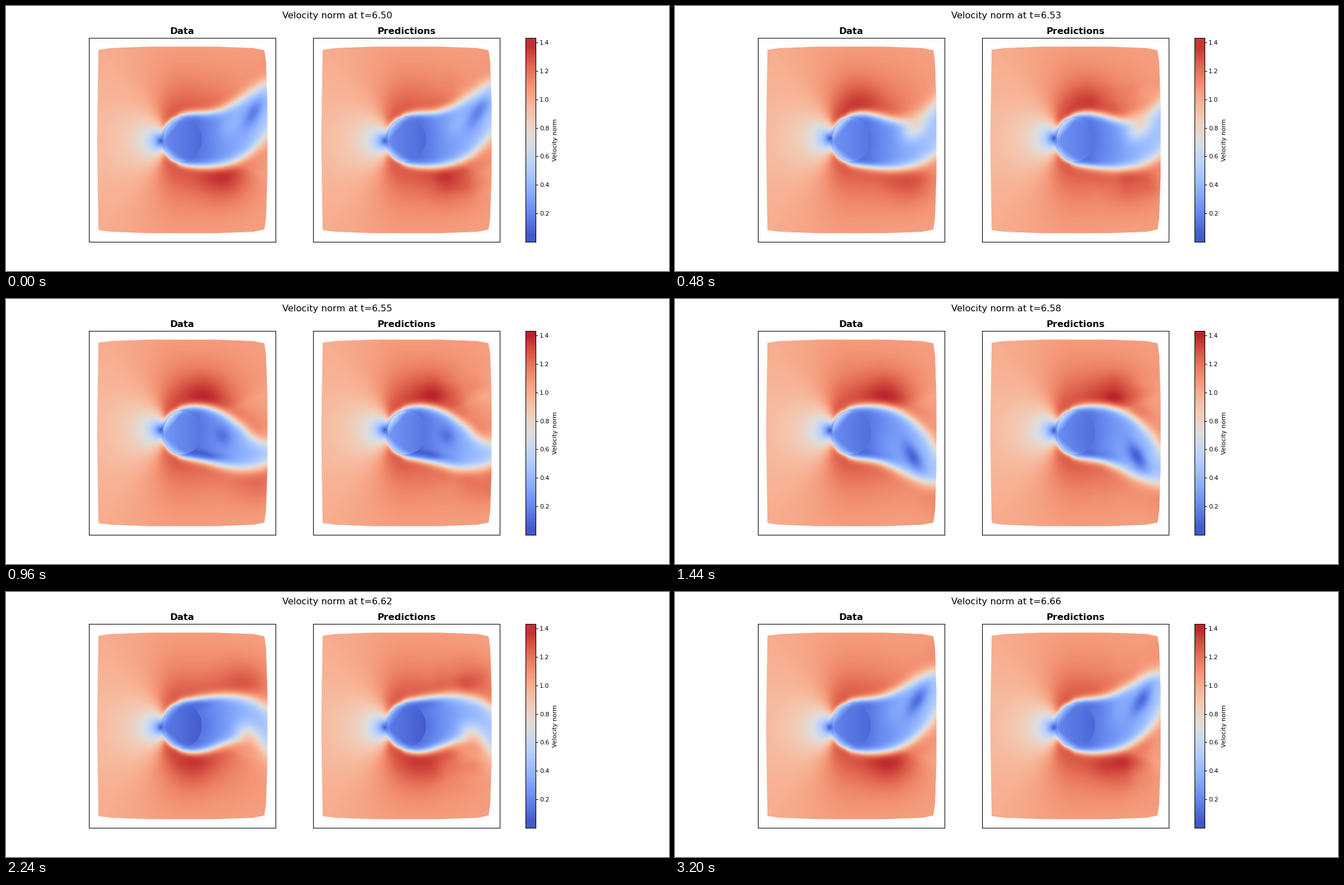
A matplotlib script that plays this animation: 1183x473 px, repeating every 3360 ms.

```python
import numpy as np
import matplotlib.pyplot as plt
from matplotlib.animation import FuncAnimation
from matplotlib.patches import Polygon

W, H, DPI = 1183, 473, 128
FRAMES, INTERVAL = 21, 160
PERIOD = 20.7                    # vortex shedding period, in frames
OMEGA = 2 * np.pi / PERIOD
VMAX = 1.432
CX, CY, RX, RY = 315, 238.5, 34.5, 38.5
LEFT, RIGHT, TOP, BOTTOM = 147.9, 481.25, 56.8, 421
GAP = 400                        # distance between the two panels

plt.rcParams["font.family"] = "DejaVu Sans"

col = np.arange(160.5, 470)
row = np.arange(70.5, 408)
xs, ys = np.meshgrid(col, row)

# The domain is symmetric about the axis
UPPER = [(162.5, 239), (163.5, 170), (165, 78), (188, 75), (255, 72.5),
         (374, 72.5), (441, 75), (461, 79), (464, 100), (466.5, 175)]
OUTLINE = UPPER + [(x, 478 - y) for x, y in reversed(UPPER)]


def step(d, width):
    return 0.5 * (1 + np.tanh(d / width))


def blob(x, y, cx, cy, long, short, angle=0.0):
    c, s = np.cos(angle), np.sin(angle)
    u = (x - cx) * c + (y - cy) * s
    v = (y - cy) * c - (x - cx) * s
    return np.exp(-(u / long) ** 2 - (v / short) ** 2)


def edge(p):
    """Height of the upper wake edge: a skewed wave that grows downstream."""
    t = np.clip((col - 325) / 141, 0, None)
    mean = 49 * (1 - np.exp(-np.maximum(col - 275, 0) / 17)) - 13 * t ** 3
    a = OMEGA * (p + 1.2 - 5.2 * t)
    y = mean - 67 * t ** 1.85 * np.sin(a + 0.55 * np.sin(a))
    slope = np.where(col > 310, np.gradient(y), 0)
    return y, np.sqrt(1 + slope ** 2)


def free_stream(p):
    """Speed around a blunt body, stretched downstream and capped."""
    x = (xs - CX) / RX
    x = np.where(x > 0, 0.38 * x, x)
    y = (ys - CY - 5 * np.cos(OMEGA * (p - 17))) / RY
    r2 = np.maximum(x * x + y * y, 0.6)
    cos2 = (x * x - y * y) / r2
    cos2 = np.where(x > 0, np.minimum(cos2, 0), cos2)
    speed = np.sqrt(np.maximum(1 - 2.5 * cos2 / r2 + (1.25 / r2) ** 2, 0))
    return np.where(speed > 1, 1 + 0.27 * np.tanh((speed - 1) / 0.27), speed)


def fast_lobe(q, dist, width, shift):
    """Fast patch that hugs one wake edge and drifts downstream."""
    total = 0
    for age in (q % PERIOD, q % PERIOD + PERIOD):
        cx = 308 + 7 * age + 0.14 * age ** 2 + shift
        amp = 0.19 * np.sin(np.pi * min(age / 23, 1)).clip(0) ** 0.7
        total = total + amp * np.exp(-((xs - cx) / (38 + age)) ** 2)
    fade = np.exp(-(np.maximum(dist - 18, 0) / 45) ** 2)
    return total * fade * step(dist, width)


def vortex(q, y):
    """Slow core, lighter patch behind it and the slow shear band."""
    q %= PERIOD
    turn = step(q - 7.5, 1.5)
    core = blob(xs, y, 350 + 12.6 * (q - 3), 50 * turn, 15 + 16 * turn, 13, 1.05)
    patch = blob(xs, y, 385 + 9.8 * (q - 9), 26 - 0.35 * (q - 10.35) ** 2,
                 26, 18, 0.9)
    band = blob(xs, y - 37 - 0.13 * (xs - 325), 352, 0, 36, 8)
    return (0.5 * step(q - 12.3, 2.3) * patch
            - 0.28 * np.exp(-((q - 9) / 3.5) ** 2) * core
            - 0.17 * np.exp(-((q - 6.3) / 2.8) ** 2) * band)


def body(p):
    """Flat facets inside the cylinder."""
    upper = ((xs - 282) * -42 + (ys - 243) * -36) / 55.3
    lower = ((xs - 282) * -33 + (ys - 243) * 41) / 52.6
    value = 0.15 + 0.05 * np.cos(OMEGA * (p - 5)) - 0.0016 * (xs - CX)
    value += (0.018 + 0.008 * np.cos(OMEGA * (p - 6))) * np.maximum(upper, 0)
    return value + 0.014 * np.maximum(lower, 0)


def ripple(p):
    """Small errors of the predicted flow."""
    a = np.sin(xs / 15 + ys / 10 - 0.8 * p) * np.sin(ys / 17 - xs / 29 + 1)
    b = np.sin(xs / 9 - ys / 13 - 1.1 * p + 2) * np.sin(xs / 23 + ys / 19)
    near = np.exp(-((np.abs(ys - CY) - 65) / 45) ** 2)
    return (0.02 * a + 0.014 * b) * near * step(xs - 360, 35)


def field(p, predicted=False):
    half = p + PERIOD / 2
    width = 5 + 8 * np.clip((col - 300) / 166, 0, 1)
    up, up_len = edge(p)
    low, low_len = edge(half)
    d_up = (CY - ys - up) / up_len
    d_low = (ys - CY - low) / low_len

    shift = 8 if predicted else 0
    outer = free_stream(p)
    outer += fast_lobe(p, d_up, width, shift)
    outer += fast_lobe(half, d_low, width, shift)

    inner = 0.13 + 0.35 * np.clip((xs - 340) / 130, 0, 1)
    inner += vortex(p, ys - CY) + vortex(half, CY - ys)
    radius = np.hypot((xs - CX) / RX, (ys - CY) / RY)
    inner = np.where(radius < 1, body(p), np.maximum(inner, 0.04))

    in_wake = step(-np.maximum(d_up, d_low), width) * step(xs - 302, 5)
    in_body = step((1.07 - radius) * 36, 4)
    mix = np.maximum(in_wake, in_body)
    speed = outer * (1 - mix) + inner * mix
    if predicted:
        speed += ripple(p)
    return np.clip(speed, 0.02, 1.39)


def pt(px):
    return px * 72 / DPI


def add_axes(x0, x1):
    ax = fig.add_axes([x0 / W, 1 - BOTTOM / H, (x1 - x0) / W, (BOTTOM - TOP) / H])
    for spine in ax.spines.values():
        spine.set_linewidth(pt(1.1))
    return ax


def label(x, y, text, size=16.43, **kw):
    return fig.text(x / W, 1 - y / H, text, fontsize=pt(size), ha="center", **kw)


def panel(offset, name):
    ax = add_axes(LEFT + offset, RIGHT + offset)
    image = ax.imshow(np.zeros_like(xs), cmap="coolwarm", vmin=0, vmax=VMAX,
                      extent=(160, 470, 408, 70), interpolation="bilinear",
                      aspect="auto")
    ax.set(xlim=(LEFT, RIGHT), ylim=(BOTTOM, TOP), xticks=[], yticks=[])
    image.set_clip_path(Polygon(OUTLINE, transform=ax.transData))
    label((LEFT + RIGHT) / 2 + offset, 50.3, name, weight="bold", va="baseline")
    return image


fig = plt.figure(figsize=(W / DPI, H / DPI), dpi=DPI, facecolor="white")
data_image = panel(0, "Data")
pred_image = panel(GAP, "Predictions")

bar_ax = add_axes(927.3, 945.4)
scale = np.linspace(0, VMAX, 256)[:, None]
bar = bar_ax.imshow(scale, cmap="coolwarm", vmin=0, vmax=VMAX, origin="lower",
                    extent=(0, 1, 0, VMAX), aspect="auto")
bar_ax.set_xticks([])
bar_ax.set_yticks(np.arange(1, 8) * 0.2)
bar_ax.yaxis.set_major_formatter("{x:.1f}")
bar_ax.yaxis.tick_right()
bar_ax.tick_params(labelsize=pt(10.95), length=pt(4), pad=pt(2.8), width=pt(1.1))
label(980, 239.5, "Velocity norm", 10.95, rotation=90, va="center")
title = label(591.5, 10, "", va="top")


def update(i):
    data = field(i)
    data_image.set_data(data)
    pred_image.set_data(field(i, predicted=True))
    bar.set_data(np.clip(scale, data.min(), data.max()))
    title.set_text(f"Velocity norm at t={6.5035 + 0.008 * i:.2f}")
    return data_image, pred_image, bar, title


anim = FuncAnimation(fig, update, frames=FRAMES, interval=INTERVAL,
                     repeat=True, repeat_delay=0, blit=False)
plt.show()
```
